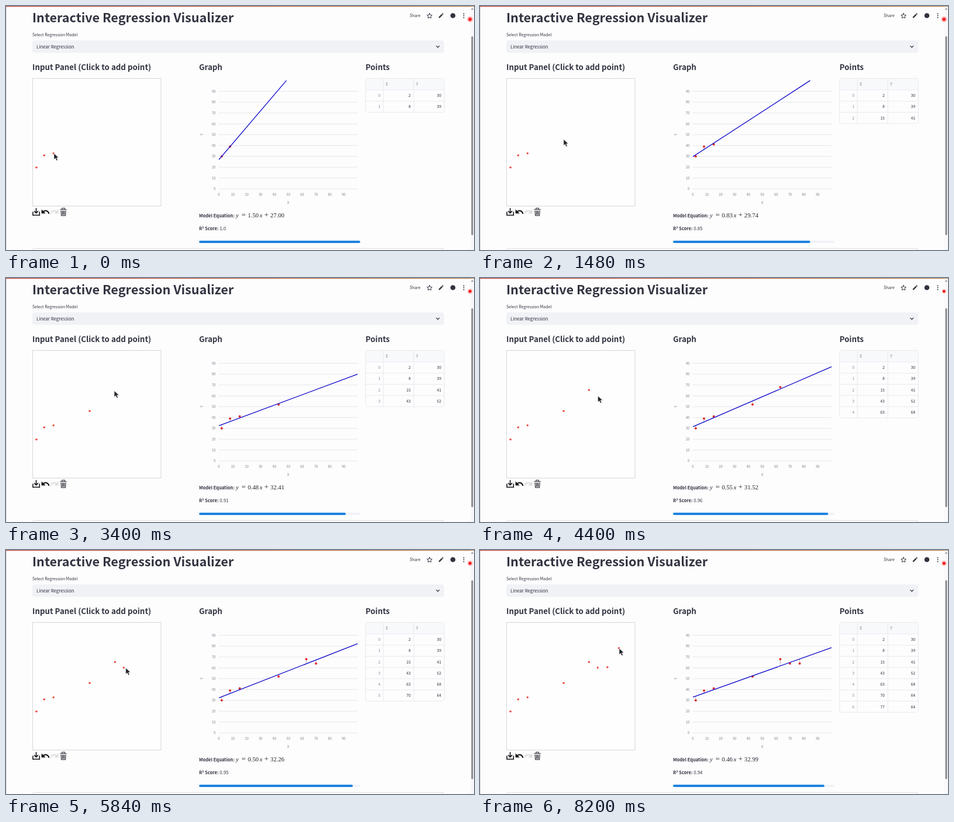
These frames come from a looping animation (800x419 px, 8.24 s). An HTML page:

```html
<!DOCTYPE html>
<html lang="en">
<head>
<meta charset="utf-8">
<title>Interactive Regression Visualizer</title>
<style>
  html, body { margin: 0; width: 100%; height: 100%; overflow: hidden; background: #fdfdfe; }
  svg { display: block; width: 100vw; height: 100vh; }
  text { font-family: "Noto Sans CJK SC", "Noto Sans CJK JP", "Noto Sans", sans-serif; font-size: 6.87px; fill: #31333f; }
  .h1 { font-size: 21.55px; font-weight: 700; }
  .h3 { font-size: 13.3px; font-weight: 700; }
  .base { font-size: 7.85px; }
  .strong { font-size: 7.55px; font-weight: 700; }
  .math { font-family: "Liberation Serif", "Times New Roman", serif; font-size: 10.7px; fill: #22232c; }
  .it { font-style: italic; }
  .axis text { font-size: 5.9px; fill: #80838f; }
  .dim { fill: #8b8e9a; }
  .end { text-anchor: end; }
  .mid { text-anchor: middle; }
  .line { fill: none; stroke: #31333f; stroke-linecap: round; stroke-linejoin: round; }
  .grid { stroke: #e4e6eb; }
  .rule { stroke: #e4e5ea; stroke-width: .8; fill: none; }
</style>
</head>
<body>
<svg viewBox="0 0 800 419" preserveAspectRatio="none">
  <defs>
    <linearGradient id="strip">
      <stop offset="0" stop-color="#c4453f"/>
      <stop offset=".6" stop-color="#bd7048"/>
      <stop offset="1" stop-color="#b98a58"/>
    </linearGradient>
    <radialGradient id="glow">
      <stop offset=".4" stop-color="#f33" stop-opacity=".75"/>
      <stop offset="1" stop-color="#f66" stop-opacity="0"/>
    </radialGradient>
  </defs>

  <rect width="800" height="419" fill="#fdfdfe"/>
  <rect width="1" height="419" fill="#d6d6da"/>
  <rect width="800" height="1.3" fill="url(#strip)"/>

  <!-- page header -->
  <text class="h1" x="45" y="28">Interactive Regression Visualizer</text>
  <text x="45" y="52.4">Select Regression Model</text>
  <rect x="45" y="59" width="704" height="21.5" rx="4" fill="#f0f2f6"/>
  <text class="base" x="52" y="72.7">Linear Regression</text>
  <path class="line" stroke-width="1.3" d="M735.8 68.7l2.4 2.4 2.4-2.4"/>

  <!-- toolbar -->
  <g id="running">
    <g class="line" stroke-width="1">
      <circle cx="644.7" cy="18.6" r="2.8"/>
      <path d="M642 14l2.4-1.2 2.2 1.3-1.6 2.5h3l.7 4.2h1.3"/>
    </g>
    <circle cx="648" cy="12.4" r="1.2" fill="#31333f"/>
    <text x="660.2" y="19">Stop</text>
  </g>
  <text x="690" y="19">Share</text>
  <path class="line" d="M724 12.6l1.3 2.8 3 .4-2.2 2.1.5 3-2.6-1.5-2.6 1.5.5-3-2.2-2.1 3-.4z"/>
  <path fill="#31333f" d="M739.8 20.4v-1.7l4.9-4.9 1.7 1.7-4.9 4.9zM745.1 13.3l.9-.8q.4-.3.8 0l.8.8q.4.4 0 .8l-.8.9z"/>
  <circle cx="763.9" cy="16.5" r="4.3" fill="#31333f"/>
  <g fill="#31333f">
    <circle cx="782.5" cy="13.3" r="1"/><circle cx="782.5" cy="16.6" r="1"/><circle cx="782.5" cy="19.9" r="1"/>
  </g>

  <!-- scrollbar and recording light -->
  <rect x="794" y="1.3" width="6" height="418" fill="#f8f8fa"/>
  <path fill="#85868a" d="M794.8 6.2l2.2-2.8 2.2 2.8z"/>
  <rect x="795.4" y="52" width="3.1" height="341.5" rx="1.5" fill="#8b8c8f"/>
  <circle id="halo" cx="793.2" cy="22.8" r="6" fill="url(#glow)"/>
  <circle cx="793.2" cy="22.8" r="2.6" fill="#f0201f"/>

  <!-- headings -->
  <text class="h3" x="45" y="110">Input Panel (Click to add point)</text>
  <text class="h3" x="330" y="110">Graph</text>
  <text class="h3" x="614.5" y="110">Points</text>

  <!-- input panel -->
  <rect x="45.5" y="124.5" width="219.5" height="219" fill="#fefefe" stroke="#d7d7da"/>
  <g id="dots" fill="#ef4f48"></g>
  <path fill="none" stroke="#17181c" stroke-width="1.6" d="M51.6 347v8.3m-3.4-3.2l3.4 3.4 3.4-3.4M46 353.2v6h11.3v-6"/>
  <g id="undo" fill="#111">
    <path d="M60.7 349.3v6.9h6.9z"/>
    <path fill="none" stroke="#111" stroke-width="2" d="M63.5 353.3c3.4-3.2 8.3-2 10 3.4"/>
  </g>
  <g fill="#ddd" transform="matrix(-1 0 0 1 150 0)">
    <path d="M60.7 349.3v6.9h6.9z"/>
    <path fill="none" stroke="#ddd" stroke-width="2" d="M63.5 353.3c3.4-3.2 8.3-2 10 3.4"/>
  </g>
  <path fill="none" stroke="#3c3d42" stroke-width="1.2" d="M92.6 349.3h11M96 349v-2h4.2v2M94 351l.6 8.9h7l.6-8.9M96.4 351.5v7M98.1 351.5v7M99.8 351.5v7"/>

  <!-- chart -->
  <g id="chart" class="axis"></g>
  <text class="strong" x="330" y="362.6">Model Equation:</text>
  <g class="eq">
    <text class="math it" x="393" y="363">y</text>
    <text class="math" x="402.5" y="363" style="font-size:13px">=</text>
    <text class="math" id="slope" x="413.2" y="363"></text>
    <text class="math it" x="433.4" y="363">x</text>
    <text class="math" x="441.6" y="363" style="font-size:13px">+</text>
    <text class="math" id="offset" x="451.8" y="363"></text>
  </g>
  <text class="strong" x="330" y="385.3">R² Score:</text>
  <text class="base" id="score" x="365.2" y="385.3"></text>
  <rect x="330" y="403" width="275.5" height="4" rx="2" fill="#f0f2f6"/>
  <rect id="bar" x="330" y="403" height="4" rx="2" fill="#1c83e1"/>

  <!-- table -->
  <g id="table"></g>

  <rect x="45.5" y="416.3" width="703.5" height="30" rx="4" fill="none" stroke="#dcdde2"/>
  <path id="cursor" fill="#222329" stroke="#fff" stroke-width=".5" d="M0 0v10.6l2.5-2.3 1.9 4.1 1.9-.9-1.8-3.9h3.5z"/>
</svg>

<script>
const LOOP = 8240, SETTLE = 80, BAR_EASE = 250;
const $ = id => document.getElementById(id);

const data = [[2, 30], [8, 39], [15, 41], [43, 52], [63, 68], [70, 64], [77, 64]];
const clicks = [[52, 277.3], [65.3, 256.5], [81.2, 253], [143, 228.5],
                [186.3, 192.2], [201.2, 202], [217.8, 201.3], [237.3, 168.6]];
const clickTimes = [1900, 3520, 4700, 6720, 8100];
// each rerun: start of work, chart redraw
const runs = [[150, 640], [1980, 2560], [3600, 4120], [4800, 5380], [6820, 7330]];
// pointer path: time, x, y
const path = [[0, 82, 253], [300, 82, 253], [840, 119.5, 232], [1500, 143, 229], [3000, 143, 229],
              [3450, 186.5, 192.5], [4050, 186.5, 192.5], [4380, 201.5, 202.5], [4800, 201.5, 202.5],
              [5300, 204.7, 202.5], [5950, 204.7, 202.5], [6500, 218, 201.5], [6900, 218, 201.5],
              [7300, 238, 169], [LOOP, 238, 169]];

function fit(n) {
  const pts = data.slice(0, n);
  const mean = k => pts.reduce((s, p) => s + p[k], 0) / n;
  const mx = mean(0), my = mean(1);
  let sxx = 0, sxy = 0, syy = 0;
  for (const [x, y] of pts) {
    sxx += (x - mx) ** 2;
    sxy += (x - mx) * (y - my);
    syy += (y - my) ** 2;
  }
  const slope = sxy / sxx;
  return { pts, slope, offset: my - slope * mx, r2: sxy * sxy / (sxx * syy) };
}

const label = (x, y, s, cls) => `<text x="${x}" y="${y}" class="${cls}">${s}</text>`;
const segment = (x1, y1, x2, y2, attrs) => `<path d="M${x1} ${y1}L${x2} ${y2}" ${attrs}/>`;

function drawChart(n, width) {
  const { pts, slope, offset } = fit(n);
  const X = x => 364 + x * width / 100, Y = y => 314 - y * 1.861;
  const at = x => slope * x + offset;
  let s = '';
  for (let v = 0; v < 100; v += 10) {
    s += segment(364, Y(v), 364 + width, Y(v), 'class="grid"');
    s += label(358.3, Y(v) + 2.2, v, 'end') + label(X(v), 325.8, v, 'mid');
  }
  s += label(X(50), 339.8, 'X', 'mid');
  s += '<text class="mid" transform="translate(337.2 220.8) rotate(-90)">Y</text>';
  for (const [x, y] of pts)
    s += segment(X(x), Y(y), X(x), Y(at(x)), 'stroke="#555" stroke-width=".9" stroke-dasharray="1.3 1.3"');
  for (const [x, y] of pts) s += `<circle cx="${X(x)}" cy="${Y(y)}" r="1.9" fill="#e3201f"/>`;
  const end = Math.min(100, (100 - offset) / slope);
  s += segment(X(0), Y(offset), X(end), Y(at(end)), 'stroke="#0d06c8" stroke-width="1.3"');
  $('chart').innerHTML = s;
}

function drawTable(n) {
  const left = 614.7, right = 749.3, top = 124.4, row = 19.25, first = top + 19.6;
  const bottom = first + n * row;
  let s = `<rect x="${left}" y="${top}" width="${right - left}" height="19.6" rx="3" fill="#f8f9fb"/>`;
  s += `<rect class="rule" x="${left}" y="${top}" width="${right - left}" height="${bottom - top}" rx="3.5"/>`;
  for (const x of [645, 697]) s += segment(x, top, x, bottom, 'class="rule"');
  s += label(649, 136.9, 'X', 'dim') + label(701, 136.9, 'Y', 'dim');
  data.slice(0, n).forEach(([x, y], i) => {
    const base = first + i * row + 12.1;
    s += segment(left, first + i * row, right, first + i * row, 'class="rule"');
    s += label(640, base, i, 'dim end') + label(691.8, base, x, 'end') + label(744, base, y, 'end');
  });
  $('table').innerHTML = s;
}

function drawModel(n) {
  const m = fit(n), r = +m.r2.toFixed(2);
  $('slope').textContent = m.slope.toFixed(2);
  $('offset').textContent = m.offset.toFixed(2);
  $('score').textContent = Number.isInteger(r) ? r + '.0' : r;
}

function drawDots(n) {
  $('dots').innerHTML = clicks.slice(0, n).map(([x, y]) => `<circle cx="${x}" cy="${y}" r="1.75"/>`).join('');
}

// redraw a part only when its inputs change
const last = {};
function update(name, draw, ...args) {
  const key = args.join();
  if (last[name] === key) return;
  last[name] = key;
  draw(...args);
}

function pointer(t) {
  const i = path.findIndex(p => p[0] > t);
  const [t0, x0, y0] = path[i - 1], [t1, x1, y1] = path[i];
  const u = (t - t0) / (t1 - t0), e = u * u * (3 - 2 * u);
  return [x0 + (x1 - x0) * e, y0 + (y1 - y0) * e];
}

function barWidth(t, n) {
  const to = fit(n).r2;
  if (n === 2) return to * 275.5;
  const u = Math.min(1, (t - runs[n - 3][1] - SETTLE) / BAR_EASE);
  const from = fit(n - 1).r2;
  return (from + (to - from) * (1 - (1 - u) ** 3)) * 275.5;
}

function render(t) {
  const drawn = 2 + runs.filter(r => t >= r[1]).length;
  const settled = 2 + runs.filter(r => t >= r[1] + SETTLE).length;
  const busy = runs.some(([a, b]) => t >= a && t < b + 120);
  update('dots', drawDots, 3 + clickTimes.filter(c => t >= c).length);
  update('chart', drawChart, drawn, drawn > settled ? 182 : 237);
  update('table', drawTable, settled);
  update('model', drawModel, settled);
  $('bar').setAttribute('width', barWidth(t, settled));
  $('running').setAttribute('visibility', busy ? 'visible' : 'hidden');
  $('cursor').setAttribute('transform', `translate(${pointer(t)})`);
  $('halo').setAttribute('opacity', .55 + .45 * Math.cos((t - 120) / 1200 * 2 * Math.PI));
}

const start = performance.now();
function tick() {
  render((performance.now() - start) % LOOP);
  requestAnimationFrame(tick);
}
tick();
</script>
</body>
</html>
```
